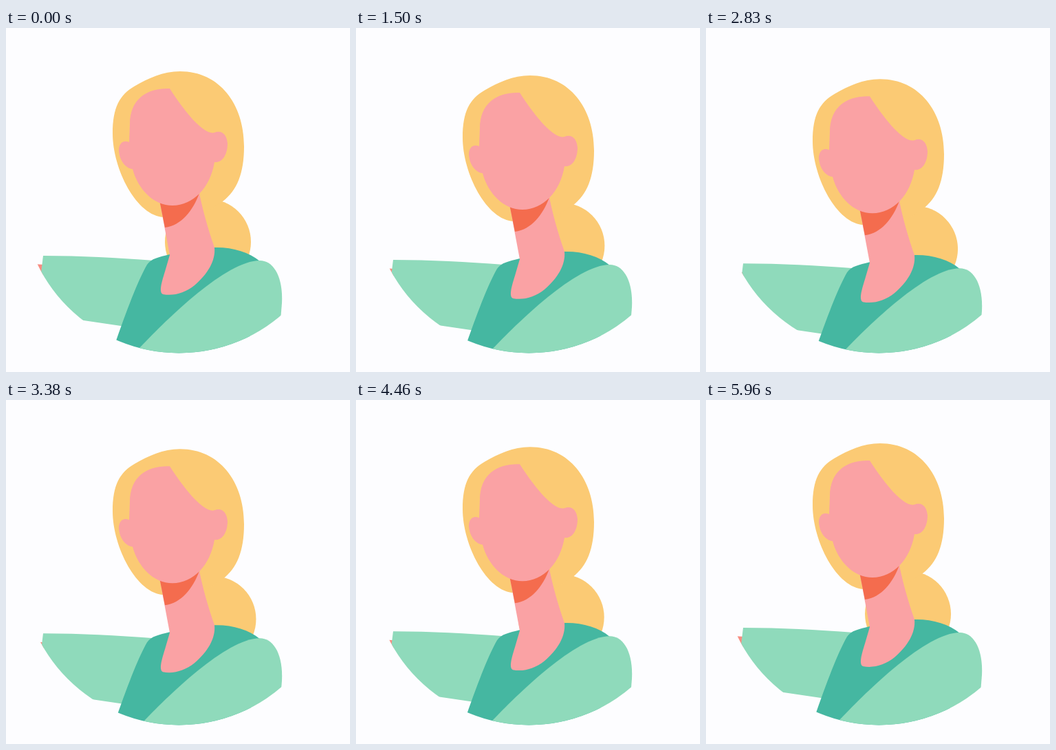
An HTML page that plays this animation: 500 px wide and 500 px high, repeating every 6 s.

```html
<!DOCTYPE html>
<html lang="en">
<head>
<meta charset="utf-8">
<title>Breathing portrait</title>
<style>
  html, body { margin: 0; width: 100%; height: 100%; overflow: hidden; background: #fdfdff; }
  svg { display: block; width: 100%; height: 100%; }
  .skin { fill: #faa2a4; }
  .hand { fill: #f88d82; }
  .hair { fill: #fbca74; }
  .sleeve { fill: #8fdabb; }
  .vest { fill: #45b7a1; }
  .shade { fill: #f46c4e; }
</style>
</head>
<body>
<svg viewBox="0 0 500 500">
  <defs>
    <clipPath id="porthole"><circle cx="251.400" cy="244" r="228.400"/></clipPath>
  </defs>
  <g clip-path="url(#porthole)">
    <circle id="bun" class="hair" cx="293.500" cy="311" r="62.500"/>
    <g id="figure">
      <path class="hair" d="M230 275C190 274 155 205 155 153C155 116 165 97 187 84.500C207 73 228 63 253 63
        C310 63 346 110 346 172C346 211 336 236 315 252L280 275Z"/>
      <path class="hand" d="M30 342.500L56 344L52 380L30 380Z"/>
      <path class="sleeve" d="M54 331C110 331 160 334 215 338L180 435L167 433L50 415.700L49 372Z"/>
      <path class="vest" d="M238 329C222 333 211 335 205 344C193 365 180 398 160.500 453L150 485L350 485L369 339
        C353 325 327 318 302 319Z"/>
      <path class="skin" d="M223 250L281 240C286 265 293 290 303 319C305 338 293 358 274 374
        C260 385 244 390 228 387C222 384 226 370 231 354L238 330Z"/>
      <path class="shade" d="M223 250L231 290C255 287 272 265 281 240Z"/>
      <path class="skin" d="M238 88C205 87 180 103 180 140L179 166C170 162 164 168 164 178
        C165 193 174 204 184 205C192 235 215 258 242 258C272 258 297 232 303 195
        C316 196 322 182 322 168C321 153 312 148 303 152C290 156 265 130 238 88Z"/>
      <path class="sleeve" d="M180 480L195 464C235 422 320 338 369 338C388 338 403 360 401 400L397 450L390 490H180Z"/>
    </g>
  </g>
</svg>
<script>
  const BREATH = 2000, FRAME = 1000 / 24, DEPTH = 12;
  const figure = document.getElementById('figure');
  const bun = document.getElementById('bun');
  const move = (el, x, y) => el.setAttribute('transform', `translate(${x} ${y})`);

  function draw(ms) {
    // Motion advances at 24 frames per second
    const time = Math.floor((ms + 4) / FRAME) * FRAME;
    const sink = DEPTH * (1 - Math.cos(2 * Math.PI * time / BREATH)) / 2;
    move(figure, 0, sink);
    move(bun, sink * 0.9, sink * 0.9);
  }

  const start = performance.now();
  function tick() {
    draw((performance.now() - start) % 6000);
    requestAnimationFrame(tick);
  }
  tick();
</script>
</body>
</html>
```
